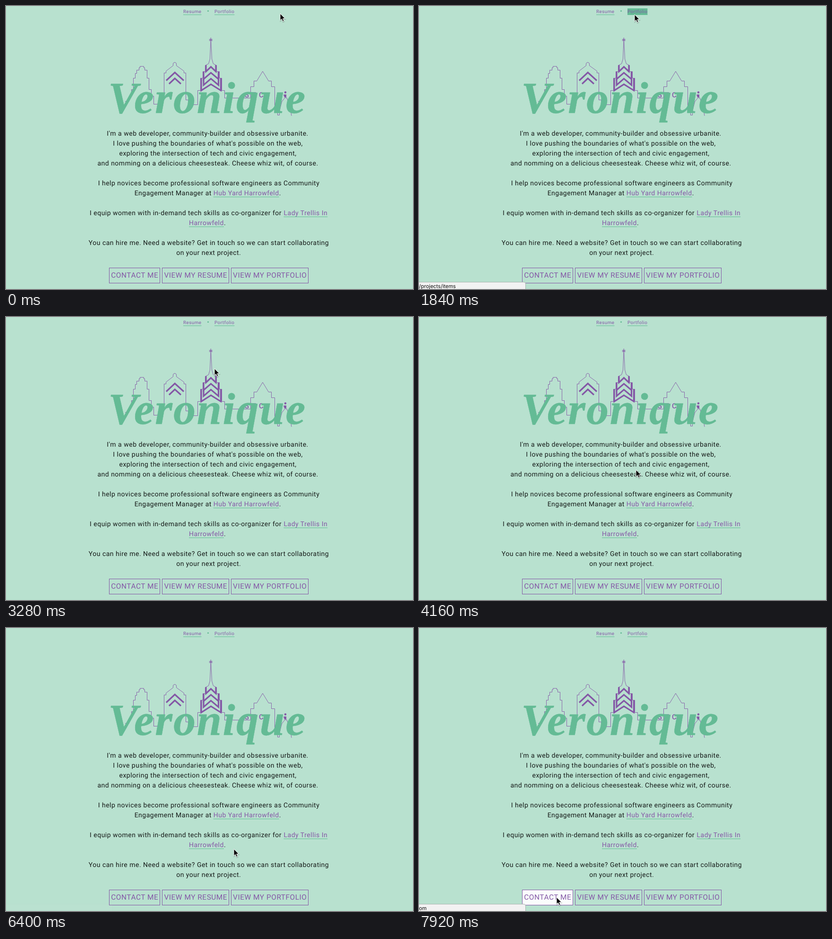
An HTML page for the animation above (8000 ms loop, 861 px wide and 598 px high).

```html
<!DOCTYPE html>
<html lang="en">
<head>
<meta charset="utf-8">
<title>Personal page</title>
<style>
  html, body { margin: 0; width: 100%; height: 100%; overflow: hidden; background: #b8e1cf; }
  svg { display: block; width: 861px; height: 598px; }
  text { font-family: Roboto, "Open Sans", sans-serif; white-space: pre; text-rendering: geometricPrecision; }
  .copy text { font-size: 14px; letter-spacing: .5px; fill: #151a18; }
  .nav text { font-size: 9.8px; letter-spacing: .5px; }
  .copy .link, .nav .link, .buttons text { fill: #8457a6; }
  .buttons text { font-size: 15.4px; letter-spacing: .55px; text-anchor: middle; }
  .buttons rect { stroke: #8457a6; fill: #fff; fill-opacity: 0; }
  .name {
    font: italic bold 94px "Liberation Serif", "Noto Serif", serif;
    letter-spacing: 2.5px; text-anchor: middle;
    fill: #64bb95; stroke: #64bb95; stroke-width: .6;
  }
  .sign { font-size: 15px; font-weight: 500; fill: #8457a6; }
  .status text { font: 11px Inter, "Liberation Sans", sans-serif; fill: #111; }
  .thin { fill: none; stroke: #8457a6; stroke-width: .9; }
  .thick { fill: none; stroke: #8457a6; stroke-width: 3.2; }
</style>
</head>
<body>
<svg id="stage" viewBox="0 0 861 598">
  <rect width="861" height="598" fill="#b8e1cf"/>
  <g class="nav" id="nav"><circle cx="427.5" cy="10.5" r="1.6" fill="#64bb95"/></g>

  <g class="thin">
    <path d="M252 201.5H260.5V190.5H265.5V176.5H269.5V152.5H273.5V142.5H276.5V135.5H281.5V130.5H283.5V127.5H291.5V130.5H293.5V135.5H298.5V152.5H302.5V176.5H307.5V190.5H312.5V207.5H327.5V198.5H334.5V141.5H338.5V137.5L353.5 126V122Q354 119.5 357 119Q360 119.5 360.5 122V126L376.5 137.5V141.5H380.5V198.5H385.5V208.5H405.5V178.5H411.5V152.5H416.5V138.5H421.5V125.5L428.5 122L431.5 112L433.3 67L435.5 112L438.5 122L445.5 125.5V138.5H451.5V152.5H456.5V178.5H462.5V194.5H517.5V170.5H524.5V158.5H530.5L543 138L555.5 158.5H561.5V170.5H568.5V222.5H574.5V230.5H578.5V222L583.5 202L590 194H594L601.5 216L604 232"/>
    <path d="M430 69.5L436.5 74M436.5 69.5L430 74M429.5 71.8H437"/>
  </g>
  <g class="thick">
    <path d="M339 157.5L357.2 140.5L376 157.5M345 164.5L357.2 153L370 164.5"/>
    <path d="M423 125V138.5L433.5 128.5L444 138.5V125"/>
    <path d="M418 139V154.5L433.5 141L449.5 154.5V139"/>
    <path d="M418 154V167L433.5 153.5L449.5 167V154"/>
    <path d="M413 153V178.5L433.5 165.5L454.5 178.5V153"/>
  </g>
  <g class="sign">
    <text x="505" y="193">S</text><text x="520" y="193">T</text><text x="535" y="193">C</text>
    <circle cx="591" cy="182.5" r="2.2"/>
    <path d="M587.5 187H593V193H588.5V190H587.5Z"/>
  </g>
  <text class="name" x="426" y="225.5">Veronique</text>

  <g class="copy" id="copy"></g>
  <g class="buttons" id="buttons"></g>

  <g class="status" id="status">
    <path d="M-1 583.5H222Q225.5 583.5 225.5 587V599H-1Z" fill="#f2f2f2" stroke="#a9b5af"/>
    <text id="address" x="0" y="596"></text>
  </g>

  <g id="cursor">
    <path d="M0 0V14.4L3.3 11.4L5.5 16.6L8 15.5L5.8 10.5H10.2Z" transform="translate(.6 1.6)" fill="#000" stroke="#000" stroke-width="2" opacity=".14"/>
    <path d="M0 0V14.4L3.3 11.4L5.5 16.6L8 15.5L5.8 10.5H10.2Z" fill="#000" stroke="#fff" stroke-width="1" stroke-linejoin="round"/>
  </g>
</svg>
<script>
const LOOP = 8000, STEP = 80, GREEN = '#64bb95';
const $ = id => document.getElementById(id);

function add(parent, tag, attrs, content = '') {
  const el = document.createElementNS('http://www.w3.org/2000/svg', tag);
  for (const key in attrs) el.setAttribute(key, attrs[key]);
  el.textContent = content;
  parent.append(el);
  return el;
}

// Underlined link; returns its hover fill and its width.
function link(parent, x, y, label, top, drop) {
  const fill = add(parent, 'rect', { x, y: top, height: y + drop + 1 - top, fill: GREEN, opacity: 0 });
  const line = add(parent, 'rect', { x, y: y + drop, height: 1, fill: GREEN });
  const width = add(parent, 'text', { x, y, class: 'link' }, label).getComputedTextLength();
  fill.setAttribute('width', width);
  line.setAttribute('width', width);
  return { fill, width };
}

const nav = $('nav'), copy = $('copy');
link(nav, 375, 15, 'Resume', 5, 3);
const work = link(nav, 441, 15, 'Portfolio', 5, 3);

[
  [426.5, 274, "I'm a web developer, community-builder and obsessive urbanite."],
  [427, 295, "I love pushing the boundaries of what's possible on the web,"],
  [427, 316, 'exploring the intersection of tech and civic engagement,'],
  [427, 337, 'and nomming on a delicious cheesesteak. Cheese whiz wit, of course.'],
  [429, 379, 'I help novices become professional software engineers as Community'],
  [353.3, 400, 'Engagement Manager at'],
  [380, 442, 'I equip women with in-demand tech skills as co-organizer for'],
  [429, 505, 'You can hire me. Need a website? Get in touch so we can start collaborating'],
  [428.7, 526, 'on your next project.']
].forEach(([x, y, line]) => add(copy, 'text', { x, y, 'text-anchor': 'middle' }, line));

const job = link(copy, 438.7, 400, 'Hub Yard Harrowfeld', 387, 3);
add(copy, 'text', { x: 438.7 + job.width, y: 400 }, '.');
link(copy, 587.5, 442, 'Lady Trellis In', 429, 3);
const town = link(copy, 387, 463, 'Harrowfeld', 450, 3);
add(copy, 'text', { x: 387 + town.width, y: 463 }, '.');

const [contact] = [
  [218, 108, 'CONTACT ME'],
  [330, 142, 'VIEW MY RESUME'],
  [476, 164, 'VIEW MY PORTFOLIO']
].map(([x, w, label]) => {
  const box = add($('buttons'), 'rect', { x: x + .5, y: 553.5, width: w - 1, height: 32 });
  add($('buttons'), 'text', { x: x + w / 2 + .3, y: 574.3 }, label);
  return box;
});

// Pointer stops: time, x, y
const path = [
  [0, 580, 16], [160, 573, 24], [1040, 573, 24], [1440, 477, 20], [1760, 456, 18],
  [2480, 456, 18], [2800, 447, 40], [3280, 441, 109], [3360, 438, 125], [3520, 452, 168],
  [3760, 452, 168], [3920, 447, 205], [4160, 459, 323], [4320, 465, 345], [4480, 465, 345],
  [4800, 468, 394], [4880, 468, 396], [5920, 468, 396], [6160, 475, 430], [6400, 482, 467],
  [6560, 484, 474], [6880, 484, 474], [7280, 385, 535], [7600, 295, 566], [7760, 291, 569], [LOOP, 291, 569]
];

const clamp = v => Math.max(0, Math.min(1, v));
const smooth = v => v * v * (3 - 2 * v);
const fade = (t, start, length) => smooth(clamp((t - start) / length));
const shown = (t, on, off, rise, fall) => fade(t, on, rise) - fade(t, off, fall);

function pointer(t) {
  const i = path.findIndex(p => p[0] > t);
  const [t0, x0, y0] = path[i - 1], [t1, x1, y1] = path[i];
  const k = (t - t0) / (t1 - t0);
  return [x0 + (x1 - x0) * k, y0 + (y1 - y0) * k];
}

function draw(now) {
  const t = Math.floor(now % LOOP / STEP) * STEP;
  $('cursor').setAttribute('transform', `translate(${pointer(t)})`);
  work.fill.setAttribute('opacity', shown(t, 1360, 2560, 320, 320));
  job.fill.setAttribute('opacity', shown(t, 4640, 5960, 320, 320));
  contact.style.fillOpacity = .93 * fade(t, 7520, 400);
  $('status').setAttribute('opacity',
    shown(t, 1440, 2720, 240, 400) + shown(t, 4720, 6000, 240, 460) + fade(t, 7520, 240));
  $('address').textContent = t < 4000 ? '/projects/items' : t < 7000 ? '' : 'om';
}

function tick(now) {
  draw(now);
  requestAnimationFrame(tick);
}
draw(0);
requestAnimationFrame(tick);
</script>
</body>
</html>
```
